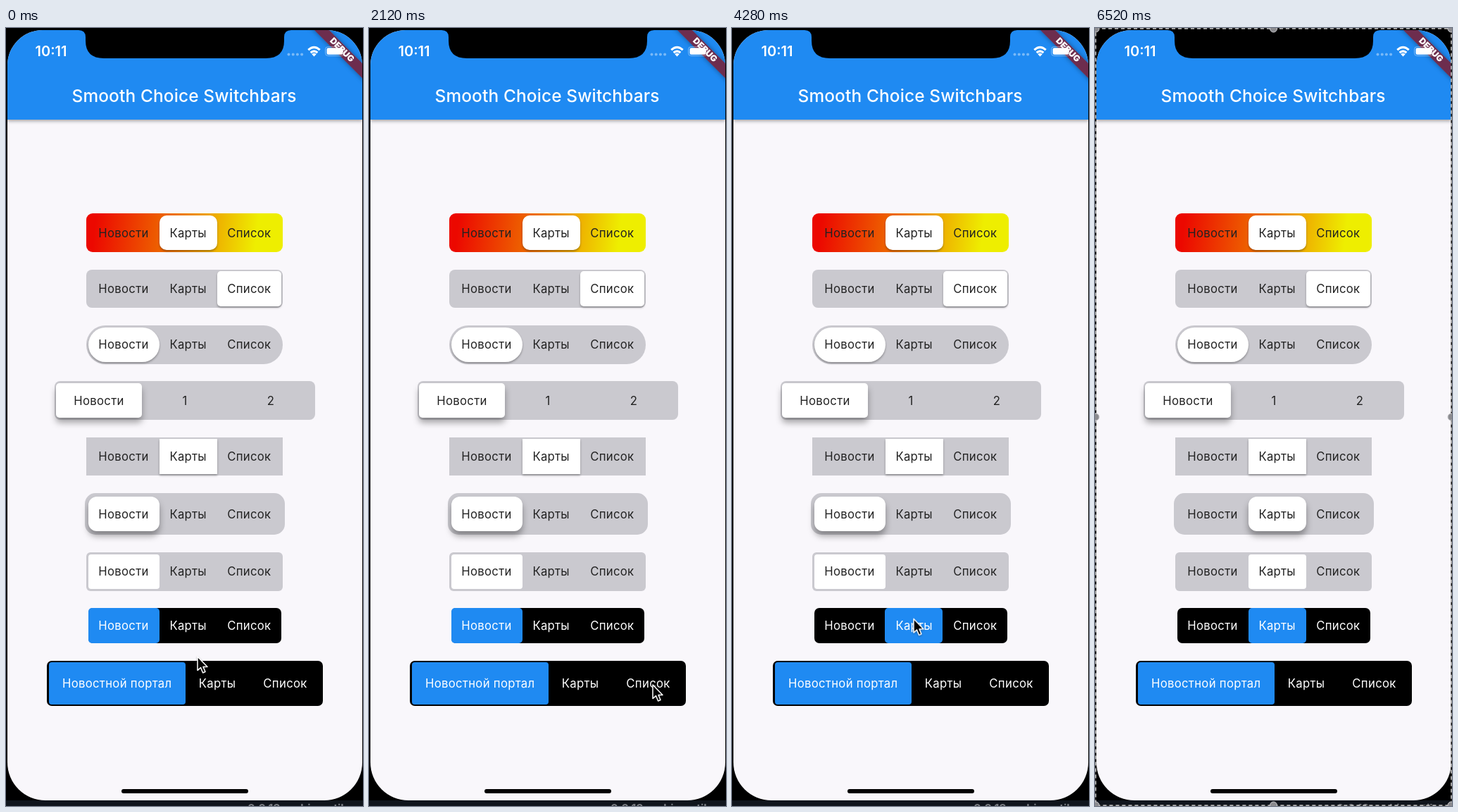
Animation of 507x1104 px, one loop 6.56 s. Source, as an HTML page:

```html
<!DOCTYPE html>
<html lang="ru">
<head>
<meta charset="utf-8">
<title>Segments</title>
<style>
  html, body { margin: 0; width: 100%; height: 100%; overflow: hidden; background: #000; }
  body { position: relative; font-family: Inter, "Open Sans", sans-serif; }
  #stage { position: absolute; left: 0; top: 0; width: 507px; height: 1104px; overflow: hidden; background: #000; }
  #stage div, #stage svg { position: absolute; box-sizing: border-box; }
  .desk { left: 0; top: 1096px; width: 507px; height: 8px; background: #10151d; overflow: hidden; }
  .desk div { left: 343px; top: 1px; font-weight: 700; font-size: 16px; line-height: 20px; color: #777a80; white-space: nowrap; }
  .screen { left: 2px; top: 3px; width: 504px; height: 1093px; border-radius: 50px 50px 54px 54px; background: #f9f7fb; overflow: hidden; }
  .bar { left: 0; top: 0; width: 504px; height: 126.5px; background: #1f8af2; box-shadow: 0 2px 5px rgba(0,0,0,.36); }
  .ribbon { left: 409px; top: 20.7px; width: 132px; height: 14.8px; transform: rotate(45deg); background: rgba(126,25,43,.82);
    color: #fff; font-size: 12.3px; font-weight: 900; line-height: 14.8px; text-align: center; box-shadow: 0 0 7px rgba(0,0,0,.4); }
  .label { width: 240px; height: 20px; line-height: 20px; text-align: center; white-space: nowrap; font-size: 16.7px; letter-spacing: .3px; color: #222; }
  .dark { color: #fff; }
  .title { font-size: 24.4px; font-weight: 500; letter-spacing: .15px; color: #fff; width: 400px; }
  .clock { font-size: 20px; font-weight: 600; color: #fff; letter-spacing: 0; }
  .home { left: 164px; top: 1080px; width: 180px; height: 6px; border-radius: 3px; background: #000; }

  .move6, .move7, .move8, .move9 { animation: 6560ms infinite ease-in-out both; }
  .move6 { animation-name: sixth; }
  .move7 { animation-name: seventh; }
  .move8 { animation-name: eighth; }
  .move9 { animation-name: ninth; }
  @keyframes sixth {
    0%, 79.27% { left: 116.5px; width: 101.5px; }
    83.84%, 100% { left: 218px; width: 81.5px; }
  }
  @keyframes seventh {
    0%, 69.97% { left: 116.5px; width: 101.5px; }
    74.54%, 100% { left: 218px; width: 81.5px; }
  }
  @keyframes eighth {
    0%, 60.98% { left: 116.5px; width: 101.5px; }
    65.55%, 100% { left: 218px; width: 81.5px; }
  }
  @keyframes ninth {
    0%, 6.1% { left: 60.5px; width: 194.5px; }
    10.67%, 22.56% { left: 255px; width: 91px; }
    27.13%, 33.84% { left: 60.5px; width: 194.5px; }
    38.41%, 45.91% { left: 346px; width: 101px; }
    50.49%, 100% { left: 60.5px; width: 194.5px; }
  }

  .cursor { left: -2px; top: -2px; overflow: visible; filter: drop-shadow(0 1px 1px rgba(0,0,0,.35)); animation: point 6560ms infinite ease-in-out both; }
  @keyframes point {
    0% { transform: translate(272px, 892px); }
    5.34% { transform: translate(278px, 922px); }
    10.67% { transform: translate(276px, 927px); }
    16.46% { transform: translate(258px, 928px); }
    21.34% { transform: translate(170px, 932px); }
    23.78% { transform: translate(168px, 933px); }
    32.32% { transform: translate(403px, 932px); }
    35.06% { transform: translate(406px, 934px); }
    44.21% { transform: translate(180px, 947px); }
    46.34% { transform: translate(177px, 948px); }
    48.78% { transform: translate(176px, 947px); }
    56.1% { transform: translate(226px, 891px); }
    60.21% { transform: translate(255px, 850px); }
    64.02% { transform: translate(258px, 848px); }
    68.9% { transform: translate(258px, 776px); }
    72.56% { transform: translate(258px, 775px); }
    78.51% { transform: translate(260px, 696px); }
    82.32% { transform: translate(260px, 700px); }
    90.7%, 100% { transform: translate(255px, 1112px); }
  }
  .frame { left: 0; top: 0; animation: show 6560ms infinite step-end both; }
  @keyframes show {
    0% { opacity: 0; }
    92.07%, 100% { opacity: 1; }
  }
</style>
</head>
<body>
<div id="stage">
  <div class="desk"><div>0.0.13 archive util</div></div>
  <div class="screen">
    <div class="bar"></div>
    <div class="ribbon">DEBUG</div>
  </div>
  <svg width="507" height="60" style="left:0;top:0">
    <path d="M103 0V3Q113 3 113 13V18Q113 43 139 43H369Q395 43 395 18V13Q395 3 405 3V0Z" fill="#000"/>
    <g fill="#fff" opacity=".4">
      <circle cx="401.5" cy="37.5" r="2"/><circle cx="407.7" cy="37.5" r="2"/>
      <circle cx="413.9" cy="37.5" r="2"/><circle cx="420.1" cy="37.5" r="2"/>
    </g>
    <g fill="none" stroke="#fff" stroke-width="3">
      <path d="M429.3 31.2Q437.5 23.6 445.7 31.2"/>
      <path d="M432.6 35Q437.5 30.8 442.4 35"/>
    </g>
    <path d="M434.2 37Q437.5 34.6 440.8 37L437.5 40.5Z" fill="#fff"/>
    <rect x="453.5" y="26.5" width="27" height="13" rx="4" fill="none" stroke="#fff" stroke-opacity=".4"/>
    <rect x="455.5" y="28.2" width="23" height="9.6" rx="2.4" fill="#fff"/>
    <path d="M482 31Q484 33 482 35Z" fill="#fff" opacity=".5"/>
  </svg>
  <div class="label clock" style="left:-56px;top:23px">10:11</div>
  <div class="label title" style="left:53px;top:85.5px">Smooth Choice Switchbars</div>
  <div id="rows"></div>
  <div class="home"></div>
  <svg class="cursor" width="20" height="28" viewBox="-2 -2 20 28">
    <path d="M0 0V19.6L4.5 15.6L7.6 23L11 21.5L8 14.4H14Z" fill="#000" stroke="#fff" stroke-width="1.5" stroke-linejoin="round"/>
  </svg>
  <svg class="frame" width="507" height="1104">
    <rect x="1" y=".8" width="505" height="1102.4" fill="none" stroke="#222" stroke-width="1.3"/>
    <rect x="1" y=".8" width="505" height="1102.4" fill="none" stroke="#e8e8e8" stroke-width="1.3" stroke-dasharray="5 4"/>
    <g fill="#8b8b8f" stroke="#c8c8cb">
      <circle cx="1" cy="1" r="5"/><circle cx="253.5" cy="1" r="5"/><circle cx="506" cy="1" r="5"/>
      <circle cx="1" cy="552" r="5"/><circle cx="506" cy="552" r="5"/>
      <circle cx="1" cy="1103" r="5"/><circle cx="253.5" cy="1103" r="5"/><circle cx="506" cy="1103" r="5"/>
    </g>
  </svg>
</div>
<script>
  const rows = document.getElementById('rows');
  const grey = '#cac9cf', blue = '#1f8af2';
  const fire = 'linear-gradient(97deg, #ec0800 5%, #ee7500 46%, #eeee00 86%)';
  const soft = '0 2px 3px rgba(0,0,0,.3)', deep = '0 7px 10px rgba(0,0,0,.34)';
  const words = ['Новости', 'Карты', 'Список'], mids = [167, 258.7, 345.3];
  const edges = [116.5, 218, 299.5, 391];

  function add(cls, style, text = '') {
    const el = document.createElement('div');
    el.className = cls;
    el.textContent = text;
    for (const k in style) el.style[k] = typeof style[k] === 'number' ? style[k] + 'px' : style[k];
    rows.append(el);
  }

  function row({ y, h = 54.5, x = 114, w = 279, r = 8, bg = grey, pick = 0, cuts = edges, pad = 2.5,
                 tr = 5, thumb = '#fff', shadow = 'none', names = words, at = mids, move = '', dark = '' }) {
    add('', { left: x, top: y, width: w, height: h, borderRadius: r, background: bg });
    add(move, { left: cuts[pick], top: y + pad, width: cuts[pick + 1] - cuts[pick], height: h - 2 * pad,
                borderRadius: tr, background: thumb, boxShadow: shadow });
    names.forEach((name, i) => add('label ' + dark, { left: at[i] - 120, top: y + h / 2 - 10 }, name));
  }

  row({ y: 263.3, r: 9, bg: fire, pick: 1, tr: 10, shadow: soft });
  row({ y: 342.8, pick: 2, shadow: soft });
  row({ y: 422, r: 27.3, tr: 25, shadow: soft });
  row({ y: 501.3, x: 68.5, w: 370.5, cuts: [71, 193], shadow: deep, names: ['Новости', '1', '2'], at: [132, 254, 376] });
  row({ y: 580.7, r: 0, pick: 1, tr: 0, shadow: soft });
  row({ y: 659.8, h: 59.5, x: 112, w: 284, r: 15, pad: 5, tr: 12, shadow: deep, move: 'move6' });
  row({ y: 744, r: 6, tr: 4, move: 'move7' });
  row({ y: 823.4, h: 49.8, x: 116.5, w: 274.5, r: 7, bg: '#000', pad: 0, thumb: blue, move: 'move8', dark: 'dark' });
  row({ y: 897.8, h: 64.4, x: 58, w: 391.5, r: 7, bg: '#000', cuts: [60.5, 255], tr: 4, thumb: blue,
        names: ['Новостной портал', 'Карты', 'Список'], at: [157.7, 300, 396.5], move: 'move9', dark: 'dark' });
</script>
</body>
</html>
```
